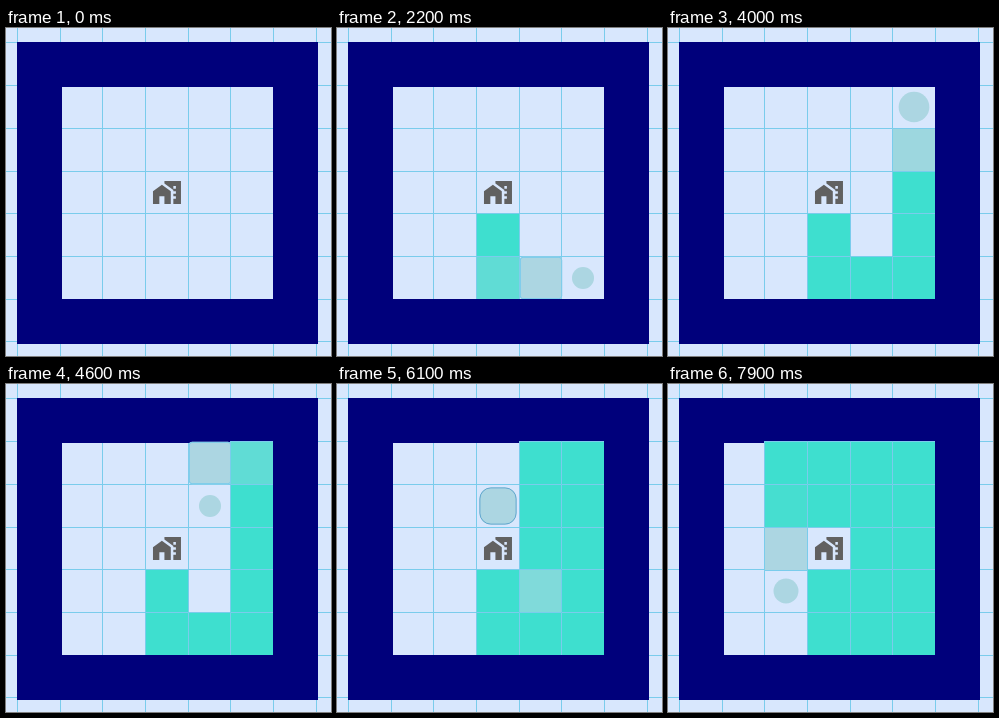
Recreate the animation shown at these times as an HTML page with a canvas. Size 325 px wide and 328 px high, loop 8 s.

```html
<!DOCTYPE html>
<html lang="en">
<head>
<meta charset="utf-8">
<title>Grid search</title>
<style>
  html, body { margin: 0; width: 100%; height: 100%; overflow: hidden; background: #d8e7fd; }
  canvas { display: block; }
</style>
</head>
<body>
<canvas id="stage" width="325" height="328"></canvas>
<script>
const ctx = document.getElementById('stage').getContext('2d');

const LOOP = 8000, TICK = 100;
const FIRST_VISIT = 985, VISIT_GAP = 400, HALF = 500;
const PITCH = 42.7, CELL = 44;
const LINE = '#7accec', WALL = '#00007b', EDGE = '#64a8d0';
const LIGHT = [172, 214, 226], VISITED = [62, 223, 207];

// Visit order as "column row" inside the walls.
const path = '23 24 34 44 43 42 41 40 30 31 32 33 21 20 10 11 12 13'.split(' ');
const cells = path
  .map(([col, row], i) => ({ col: +col, row: +row, start: FIRST_VISIT + i * VISIT_GAP }))
  .sort((a, b) => a.row - b.row || a.col - b.col);

const home = new Path2D('M1 11v10h5v-6h4v6h5V11L8 6z' +
  'M10 3v1.97l7 5V11h2v2h-2v2h2v2h-2v4h6V3H10zm9 6h-2V7h2v2z');

const lineX = i => Math.round(10.9 + PITCH * i);
const lineY = i => Math.round(14.45 + PITCH * i);
const ease = t => {
  t = Math.min(1, Math.max(0, t));
  return t * t * (3 - 2 * t);
};

function rect(color, x, y, w, h) {
  ctx.fillStyle = color;
  ctx.fillRect(x, y, w, h);
}

function drawCell({ col, row, start }, time) {
  const age = time - start;
  if (age < 0) return;
  const grow = ease(age / HALF);
  const tint = ease((age - HALF) / HALF);
  const size = CELL * (0.5 + 0.5 * grow);
  const x = lineX(col + 1) + (CELL - size) / 2;
  const y = lineY(row + 1) + (CELL - size) / 2;
  const radius = size * Math.min(0.5, 1 - grow);

  ctx.fillStyle = `rgb(${LIGHT.map((c, i) => Math.round(c + (VISITED[i] - c) * tint))})`;
  ctx.beginPath();
  ctx.roundRect(x, y, size, size, radius);
  ctx.fill();

  if (grow >= 0.5) {
    ctx.strokeStyle = grow < 0.9 ? EDGE : LINE;
    ctx.beginPath();
    ctx.roundRect(x + 0.5, y + 0.5, size - 1, size - 1, Math.max(0, radius - 0.5));
    ctx.stroke();
  }
}

function draw(time) {
  rect('#d8e7fd', 0, 0, 325, 328);
  for (let i = 0; i < 8; i++) {
    rect(LINE, lineX(i), 0, 1, 328);
    rect(LINE, 0, lineY(i), 325, 1);
  }

  // Cells overlap the top and left walls but slide under the right and bottom ones.
  rect(WALL, 11, 14, 301, 45);
  rect(WALL, 11, 14, 45, 302);
  cells.forEach(cell => drawCell(cell, time));
  rect(WALL, 267, 14, 45, 302);
  rect(WALL, 11, 271, 301, 45);

  ctx.save();
  ctx.translate(145.7, 149.2);
  ctx.scale(1.273, 1.273);
  ctx.fillStyle = '#616161';
  ctx.fill(home);
  ctx.restore();
}

const origin = performance.now();
function loop() {
  const time = (performance.now() - origin) % LOOP;
  draw(Math.floor(time / TICK) * TICK);
  requestAnimationFrame(loop);
}
loop();
</script>
</body>
</html>
```
